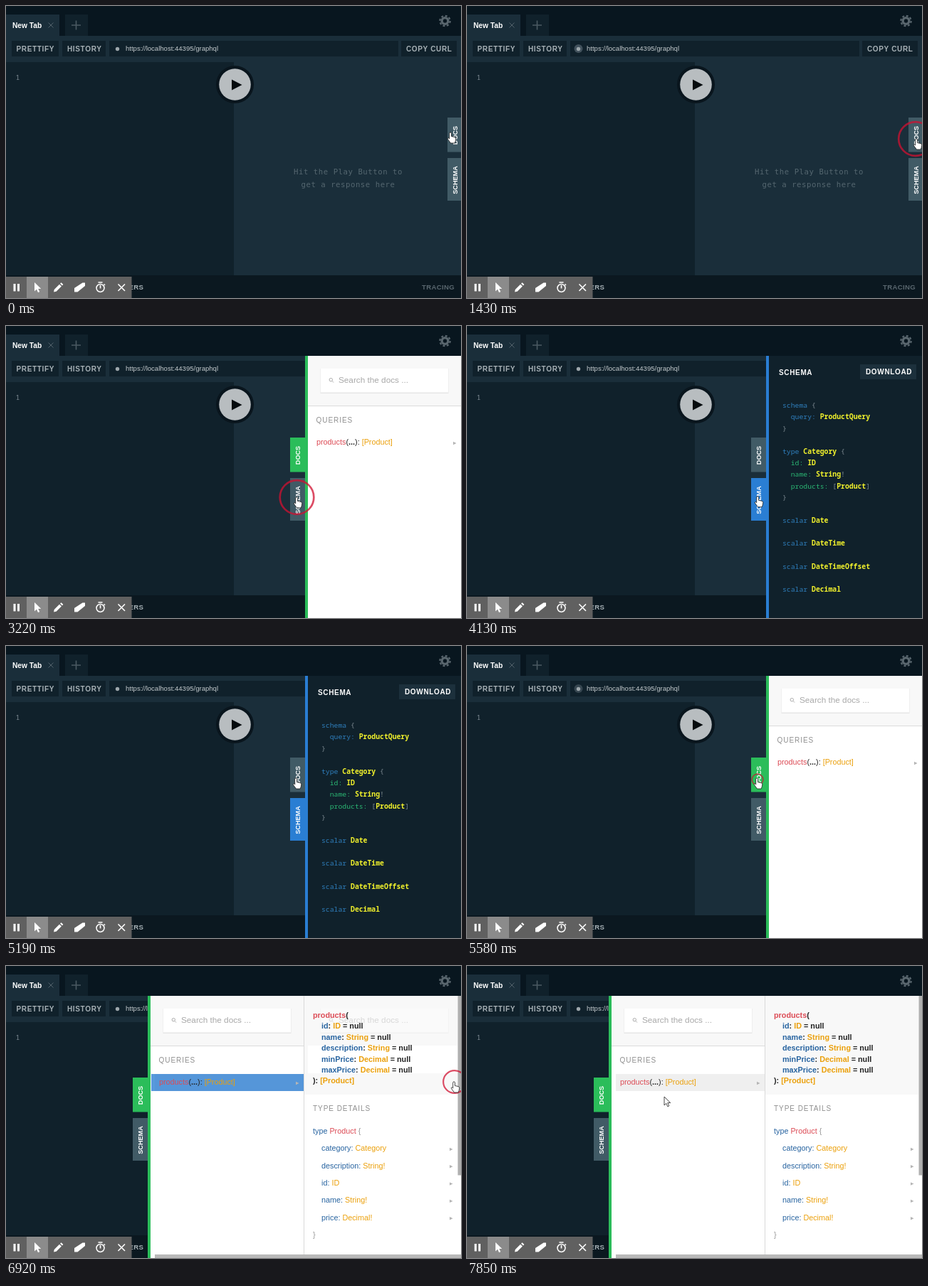
Write an HTML page that moves like this. It is 639 px wide and 411 px high and loops after 8 s.

```html
<!DOCTYPE html>
<html lang="en">
<head>
<meta charset="utf-8">
<title>API playground</title>
<style>
html, body { margin: 0; width: 100%; height: 100%; overflow: hidden; background: #08161f; }
svg { display: block; width: 639px; height: 411px; }
text { font: 10.8px "Liberation Sans", Arial, sans-serif; fill: #999; white-space: pre; }
text.btn { font-size: 10px; font-weight: bold; letter-spacing: .65px; fill: #a6b0b5; }
text.white { fill: #fff; }
text.foot { font-size: 9.6px; font-weight: bold; letter-spacing: .35px; fill: #59666e; }
text.tab { font-size: 9.1px; font-weight: bold; fill: #fff; text-anchor: middle; }
text.hint { font: 10.6px "DejaVu Sans Mono", monospace; letter-spacing: .57px; fill: #556770; text-anchor: middle; }
text.code { font: 9.78px "Noto Sans Mono", "DejaVu Sans Mono", monospace; fill: #7d8a92; }
text.head { font-size: 10px; letter-spacing: .95px; fill: #8f8f8f; }
text.search { font-size: 11.75px; fill: #a8a8a8; }
text.bold { font-weight: bold; }
.kw { fill: #2f7fbd; }
.prop { fill: #2bb673; }
.name { fill: #f2f22c; font-weight: bold; }
.field { fill: #2864a0; }
.type { fill: #eba00c; }
.query { fill: #dc4b55; }
.dark { fill: #222; }
.hover text, .hover tspan, .hover path { fill: #fff; }
</style>
</head>
<body>
<svg viewBox="0 0 639 411">
  <rect width="639" height="411" fill="#08161f"/>
  <path d="M0 12H75V42H639V379H0z" fill="#1a2e3a"/>
  <path d="M83 12h32v30h-32z" fill="#10212b"/>
  <text x="9" y="30.5" class="bold white" style="font-size:10.2px">New Tab</text>
  <path d="M59.5 23.500l7 7m0-7l-7 7" stroke="#53626b"/>
  <path d="M92 27h13m-6.500-6.500v13" stroke="#4b5a63" stroke-width="1.6"/>
  <g fill="none" stroke="#59666e">
    <circle cx="616.500" cy="21" r="4.400" stroke-width="3.400"/>
    <circle cx="616.500" cy="21" r="7.200" stroke-width="2.200" stroke-dasharray="3 2.655"/>
  </g>

  <path d="M8 49h66v22h-66zM79 49h61v22h-61zM145 49h406v22h-406zM555 49h78v22h-78zM0 79H320V379H0z" fill="#10212b"/>
  <text x="14.500" y="63.500" class="btn">PRETTIFY</text>
  <text x="86" y="63.500" class="btn">HISTORY</text>
  <text x="562" y="63.500" class="btn">COPY CURL</text>
  <circle id="halo" cx="156.500" cy="60" r="6" fill="#44545e"/>
  <circle cx="156.500" cy="60.500" r="2.700" fill="#9da7ac"/>
  <text x="168" y="63.300" style="font-size:9.55px;fill:#c3cacd">https://localhost:44395/graphql</text>

  <text x="13.500" y="104" class="code">1</text>
  <rect id="caret" x="31" y="94" width="1.500" height="17" fill="#84929a"/>
  <text x="480.500" y="237" class="hint">Hit the Play Button to</text>
  <text x="480.500" y="255" class="hint">get a response here</text>
  <circle cx="321.500" cy="110.500" r="26.500" fill="#09151d"/>
  <circle cx="321.500" cy="110.500" r="22.300" fill="#b8bdc0"/>
  <path d="M317 103.500L331.500 111L317 118.500z" fill="#060b0e"/>

  <rect y="379" width="639" height="32" fill="#0b1820"/>
  <text x="172.500" y="398.500" class="foot" style="fill:#a6b0b5">ERS</text>
  <text x="584" y="398.500" class="foot">TRACING</text>

  <g id="drawer">
    <g id="tabs">
      <rect id="docsTab" x="620" y="157" width="21" height="48.500"/>
      <rect id="schemaTab" x="620" y="214" width="21" height="60"/>
      <text class="tab" transform="translate(633.500 182)rotate(-90)">DOCS</text>
      <text class="tab" transform="translate(633.500 245)rotate(-90)">SCHEMA</text>
    </g>
    <rect id="edge" x="641" y="42" width="4" height="369"/>
    <g id="docs"></g>
    <g id="schema"></g>
  </g>

  <g id="recorder" fill="#fff">
    <rect y="381" width="176.500" height="30" fill="#606060"/>
    <rect x="29" y="381" width="30" height="30" fill="#8b8b8b"/>
    <path d="M10.500 391h3v10.500h-3zM16 391h3v10.500h-3z"/>
    <path d="M40 389v12.500l3-2.700 2 4.500 2.200-1-2-4.300h4z"/>
    <path d="M67 402.500l.8-3.600 7.200-7.200 2.900 2.900-7.200 7.200zM76 390.700l1.500-1.500 2.900 2.900-1.500 1.500z"/>
    <path d="M96 397l11.500-7.500h3.500v4.500l-10.500 8.500h-4.500z"/>
    <path d="M157.500 391.500l9.500 9.500m0-9.500l-9.500 9.500M129.500 389h6M132.500 393v4.500M137.500 391.500l1.500 1.500" fill="none" stroke="#fff" stroke-width="1.600"/>
    <circle cx="132.500" cy="397" r="5.500" fill="none" stroke="#fff" stroke-width="1.500"/>
  </g>

  <circle id="ring" fill="none" stroke="#d01030" stroke-opacity=".75"/>
  <path id="cursor" stroke="#1b1b1b" stroke-width=".8" fill="#fff"/>
</svg>
<script>
const $ = id => document.getElementById(id);
const span = (cls, s) => `<tspan class="${cls}">${s}</tspan>`;
const text = (x, y, s, cls = "") => `<text x="${x}" y="${y}" class="${cls}">${s}</text>`;
const rect = (x, y, w, h, fill, extra = "") =>
  `<rect x="${x}" y="${y}" width="${w}" height="${h}" fill="${fill}" ${extra}/>`;
const more = (x, y) => `<path d="M${x - 2} ${y - 2.2}l4.500 2.200-4.500 2.200z" fill="#b5b5b5"/>`;
const show = (id, on) => $(id).style.display = on ? "" : "none";

const searchBox = x =>
  rect(x - .5, 60, 180, 35, "#e6e6e6") + rect(x, 60, 179, 33.5, "#fff") +
  `<path d="M${x + 16} 77.500l2 2" stroke="#aaa"/><circle cx="${x + 14.3}" cy="75.700" r="2.200" fill="none" stroke="#aaa"/>` +
  text(x + 25, 80.3, "Search the docs ...", "search");

// The drawer is laid out just past the right edge and slides left as it opens.
const args = [["id", "ID"], ["name", "String"], ["description", "String"], ["minPrice", "Decimal"], ["maxPrice", "Decimal"]];
const fields = [["category", "Category"], ["description", "String!"], ["id", "ID"], ["name", "String!"], ["price", "Decimal!"]];
$("docs").innerHTML =
  rect(645, 42, 440, 369, "#fff") +
  rect(645, 42, 215, 70, "#f8f8f8") + rect(645, 112, 215, 1, "#dcdcdc") +
  searchBox(663) + text(656.5, 135.6, "QUERIES", "head") +
  rect(651, 152, 209, 24, "#efefef", 'id="active"') + rect(646, 152, 214, 24, "#2a7ed3", 'id="hot"') +
  `<g id="row">${text(657, 167.3, span("query", "products") + span("dark", "(<tspan font-weight='bold'>...</tspan>): ") + span("type", "[Product]"))}${more(851, 165)}</g>` +
  rect(860, 42, 1, 369, "#d9d9d9") + rect(861, 42, 215, 139, "#f8f8f8") +
  `<g id="ghost">${rect(866, 112, 210, 39, "#fff")}<g opacity=".4">${searchBox(884)}</g></g>` +
  text(873, 72.5, span("query", "products") + span("dark", "("), "bold") +
  args.map(([n, t], i) => text(885, 88 + i * 15.5,
    span("field", n) + span("dark", ": ") + span("type", t) + span("dark", " = null"), "bold")).join("") +
  text(873, 165.3, span("dark", "): ") + span("type", "[Product]"), "bold") +
  text(873, 204, "TYPE DETAILS", "head") +
  text(873, 236, span("field", "type ") + span("query", "Product") + " {") +
  fields.map(([n, t], i) => text(885, 260.3 + i * 24.3, span("field", n + ": ") + span("type", t)) +
    (t === "ID" ? "" : "") + more(1067, 258 + i * 24.3)).join("") +
  text(873, 382, "}") +
  rect(1076.5, 42, 5, 252.5, "#b0b0b0") + rect(651, 406, 432, 5, "#b9b9b9", 'id="scroll"');

const lines = [
  [0, span("kw", "schema") + " {"], [1, span("kw", "query: ") + span("name", "ProductQuery"), 1], [2, "}"],
  [4, span("kw", "type ") + span("name", "Category") + " {"],
  [5, span("prop", "id: ") + span("name", "ID"), 1],
  [6, span("prop", "name: ") + span("name", "String") + "!", 1],
  [7, span("prop", "products: ") + "[" + span("name", "Product") + "]", 1], [8, "}"],
  ...["Date", "DateTime", "DateTimeOffset", "Decimal"].map((n, i) => [10 + 2 * i, span("kw", "scalar ") + span("name", n)])
];
$("schema").innerHTML =
  rect(645, 42, 216, 369, "#10212b") + text(659, 69.3, "SCHEMA", "btn white") +
  rect(773, 54, 79, 21, "#1c303c") + text(781, 67.7, "DOWNLOAD", "btn white") +
  lines.map(([n, s, indent = 0]) => text(664 + indent * 11.74, 115.3 + n * 16.18, s, "code")).join("");

// time, x, y of the pointer tip
const path = [
  [0, 623, 178], [130, 624, 177], [1170, 624, 177], [1300, 630, 187], [1850, 630, 187],
  [1990, 616, 187], [2140, 486, 187], [2290, 423, 200], [2440, 415, 212], [2700, 407, 240],
  [2830, 407, 240], [2960, 406, 241], [3220, 407, 241], [4000, 407, 240], [4540, 407, 239],
  [5100, 406, 186], [5650, 406, 186], [6100, 541, 163], [6250, 541, 163], [6380, 612, 164],
  [6530, 628, 163], [7200, 628, 163], [7330, 570, 195], [7460, 420, 213], [7590, 310, 198],
  [7720, 277, 184], [8000, 277, 184]
];
// press, release, shrink time, x, y
const clicks = [
  [1250, 1430, 130, 630, 187], [3100, 3220, 130, 408.5, 241],
  [5260, 5450, 195, 408, 188], [6600, 6855, 195, 630, 163]
];
const hand = "M-.3 1.300a1.400 1.400 0 0 1 2.800 0V5.500l4.500 1q2 .5 1.800 2.500l-.7 3.500-1 2.500H1.500L-2.500 9.500q-.8-1.600.9-1.700L-.3 9z";
const arrow = "M0 0V12l2.800-2.600 2 4.400 2-.9-2-4.300h3.900z";
const clamp = v => Math.max(0, Math.min(1, v));

function pointer(t) {
  const i = path.findIndex(k => k[0] > t);
  const [t0, x0, y0] = path[i - 1], [t1, x1, y1] = path[i];
  const p = (t - t0) / (t1 - t0);
  return [x0 + (x1 - x0) * p, y0 + (y1 - y0) * p];
}

function drawRing(t) {
  const click = clicks.find(([down, up, fall]) => t >= down && t < up + fall);
  show("ring", click);
  if (!click) return;
  const [down, up, fall, x, y] = click;
  const size = clamp((t - down) / 120) * clamp(1 - (t - up) / fall);
  const ring = $("ring");
  ring.setAttribute("cx", x);
  ring.setAttribute("cy", y);
  ring.setAttribute("r", 24 * size);
  ring.setAttribute("stroke-width", 1 + 1.7 * size);
}

function draw(t) {
  const open = t >= 1560, wide = t >= 6920;
  const schema = t >= 3350 && t < 5500;
  const [x, y] = pointer(t);
  const hover = open && !schema && !wide && x > 424 && y > 152 && y < 176;

  $("drawer").setAttribute("transform", `translate(${wide ? -442 : open ? -221 : 0} 0)`);
  $("docsTab").setAttribute("fill", open && !schema ? "#2bbd5a" : "#415b66");
  $("schemaTab").setAttribute("fill", schema ? "#2a7ed3" : "#415b66");
  $("edge").setAttribute("fill", schema ? "#2a7ed3" : "#2bbd5a");
  show("schema", schema);
  show("active", wide);
  show("scroll", wide);
  show("ghost", t >= 6920 && t < 7050);
  $("hot").setAttribute("opacity", hover ? 1 : wide ? .78 * clamp(1 - (t - 6920) / 230) : 0);
  $("row").setAttribute("class", hover ? "hover" : "");

  show("caret", t >= 390 && t < 910);
  $("halo").setAttribute("opacity", Math.sin(Math.PI * clamp((t % 2000 - 1250) / 450)));

  const isArrow = t > 7050 || t > 1900 && x > 424 && !hover && !wide;
  $("cursor").setAttribute("d", isArrow ? arrow : hand);
  $("cursor").setAttribute("transform", `translate(${x} ${y})`);
  drawRing(t);
}

const start = performance.now();
(function loop() {
  draw((performance.now() - start) % 8000);
  requestAnimationFrame(loop);
})();
</script>
</body>
</html>
```
